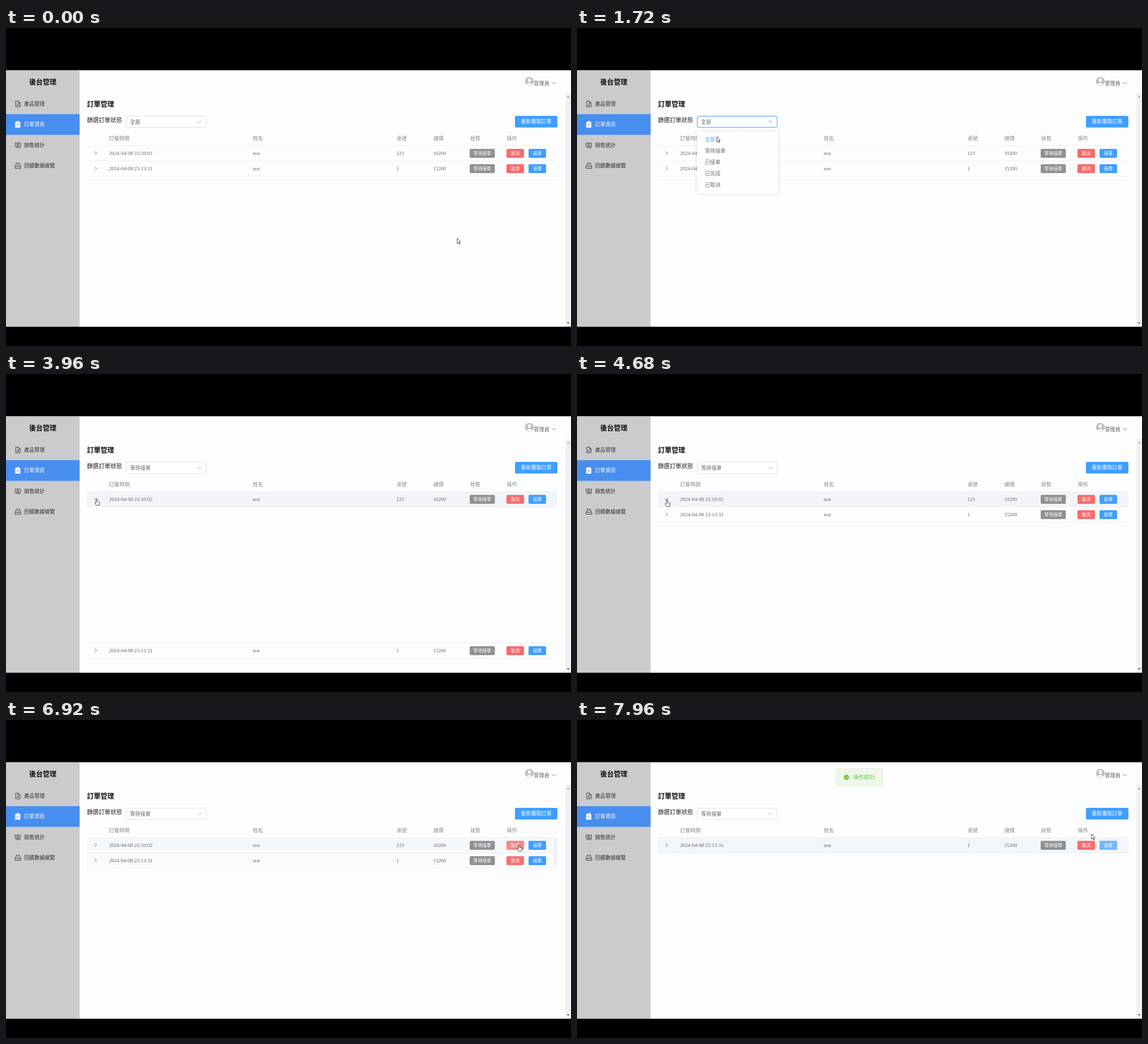
These frames come from a looping animation (998 px wide and 561 px high, 8 s). An HTML page:

```html
<!DOCTYPE html>
<html lang="zh-TW">
<head>
<meta charset="utf-8">
<title>訂單管理</title>
<style>
  html, body { margin: 0; width: 100%; height: 100%; overflow: hidden; background: #000; }
  svg { display: block; width: 998px; height: 561px; }
  text {
    font-family: "Liberation Serif", "Noto Sans CJK TC", "Noto Sans CJK", "Noto Sans CJK JP", serif;
    font-size: 9.07px; fill: #606266;
  }
</style>
</head>
<body>
<svg id="stage" viewBox="0 0 998 561"></svg>
<script>
const NS = 'http://www.w3.org/2000/svg';
const LOOP = 8000;
const BLUE = '#409eff', RED = '#f56c6c', GREEN = '#67c23a';
const stage = document.getElementById('stage');

function el(parent, tag, attrs = {}) {
  const node = document.createElementNS(NS, tag);
  for (const k in attrs) node.setAttribute(k, attrs[k]);
  parent.appendChild(node);
  return node;
}
const group = (p, attrs) => el(p, 'g', attrs);
const rect = (p, x, y, width, height, fill, more) =>
  el(p, 'rect', { x, y, width, height, fill, ...more });
const path = (p, d, stroke, more) =>
  el(p, 'path', { d, fill: 'none', stroke, 'stroke-width': 1, ...more });
// y is the middle of the line of text
function label(p, x, y, str, { size = 9.07, fill = '#606266', weight = 400 } = {}) {
  const n = el(p, 'text', { x, y: y + size * 0.37, style: `font-size:${size}px;fill:${fill};font-weight:${weight}` });
  n.textContent = str;
  return n;
}
const move = (n, x, y, rot = 0) => n.setAttribute('transform', `translate(${x} ${y}) rotate(${rot})`);
const alpha = (n, v) => n.setAttribute('opacity', v.toFixed(3));

// ---------- timing ----------
const clamp = x => Math.max(0, Math.min(1, x));
const smooth = x => { x = clamp(x); return x * x * (3 - 2 * x); };
const fade = (t, on, off, d) => smooth((t - on) / d) - smooth((t - off) / d);

const MENU = [[1000, 1630], [1950, 2350]];
const EXPAND = [[3040, 4630], [5240, 6260]];
const PICK = 2350, BLUR = 3040, REMOVED = 7360;
const BUSY = [7060, 7360];
const TOAST = 7520;
const DETAIL = 240;

// time, x, y of the pointer tip
const TRACK = [
  [0, 797, 371], [160, 797, 371], [820, 300, 162], [1080, 290, 163],
  [1400, 247, 191.5], [1700, 247, 191.5], [1720, 247, 191.5], [1880, 262, 163],
  [2000, 262, 164], [2220, 250, 212], [2440, 250, 212], [2820, 163, 216],
  [3200, 163, 216], [4400, 159, 222], [4720, 159, 222], [5040, 159, 244],
  [6300, 159, 244], [6700, 880, 290], [6880, 906, 220], [7140, 906, 220],
  [7440, 949, 224], [7830, 949, 224], [7960, 909, 201]
];
function pointer(t) {
  let i = 0;
  while (i < TRACK.length - 2 && t > TRACK[i + 1][0]) i++;
  const [a, ax, ay] = TRACK[i], [b, bx, by] = TRACK[i + 1];
  const k = smooth((t - a) / (b - a));
  return [ax + (bx - ax) * k, ay + (by - ay) * k];
}
const within = (t, [a, b]) => t >= a && t < b;
const menuOpen = t => MENU.some(m => within(t, m));
const grown = (t, i) => within(t, EXPAND[i]) ? DETAIL : 0;
const rowTop = (t, i) => i === 0 ? 208 : t >= REMOVED ? 208 : 235 + grown(t, 0);
const rowShown = (t, i) => i === 1 || t < REMOVED;
const onRow = (t, i) => {
  const y = pointer(t)[1] - rowTop(t, i);
  return rowShown(t, i) && !menuOpen(t) && y >= 0 && y < 27;
};
const onSpan = (t, i, a, b) => {
  const x = pointer(t)[0], y = pointer(t)[1] - rowTop(t, i);
  return rowShown(t, i) && x >= a && x < b && y > 4 && y < 22;
};
// share of the last 240 ms in which a test held
function recent(t, test) {
  let n = 0;
  for (let k = 0; k < 12; k++) if (test(Math.max(0, t - k * 20))) n++;
  return Math.sin(n / 12 * Math.PI / 2);
}
function overLink(t) {
  if (t > BUSY[0] + 40) return false;
  const [x, y] = pointer(t);
  if (x > 212 && x < 354 && y > 155 && y < 176) return true;
  if (menuOpen(t - 90) && x > 212 && x < 354 && y > 183 && y < 292) return true;
  return [0, 1].some(i => onSpan(t, i, 150, 168) || onSpan(t, i, 884, 915) || onSpan(t, i, 923, 954));
}

// ---------- page ----------
rect(stage, 0, 0, 998, 561, '#000');
const clip = el(el(stage, 'defs'), 'clipPath', { id: 'page' });
rect(clip, 0, 74, 998, 453);
const page = group(stage, { 'clip-path': 'url(#page)' });
rect(page, 0, 74, 998, 453, '#fdfdfd');

// sidebar
rect(page, 0, 74, 130, 453, '#cbcbcd');
rect(page, 0, 152, 130, 36.5, '#488eee');
label(page, 41, 96, '後台管理', { size: 12, fill: '#111', weight: 700 });
['產品管理', '訂單資訊', '銷售統計', '回饋數據總覽'].forEach((s, i) =>
  label(page, 32, 133.5 + i * 36.5, s, { fill: i === 1 ? '#fff' : '#303133' }));
path(page, 'M17 129h5l3 3v7h-8zM22 129v3h3M19 134h4M19 136.500h4', '#303133', { 'stroke-width': .9 });
path(page, 'M16.500 166h8.500v9.500h-8.500zM19 164.500h3.500v2.500h-3.500z', '#fff', { fill: '#fff', 'stroke-width': .5 });
path(page, 'M18.500 169.500h4.500M18.500 172h4.500', '#488eee', { 'stroke-width': .8 });
path(page, 'M16 203h9.500v6h-9.500zM17.500 211h8', '#303133', { 'stroke-width': .9 });
el(page, 'circle', { cx: 20.7, cy: 206, r: 1.6, fill: 'none', stroke: '#303133', 'stroke-width': .9 });
path(page, 'M16 243l2-2v-2.500h6v2.500l2 2v4.500h-10zM16 243l3 1.500h4l3-1.500M19.500 241.500h3', '#303133', { 'stroke-width': .9 });

// account
el(page, 'circle', { cx: 924.5, cy: 94, r: 7.8, fill: '#c0c0cc' });
el(page, 'circle', { cx: 924.5, cy: 92, r: 2.9, fill: '#fdfdfd' });
path(page, 'M919.500 99.500q5-5.500 10 0q-5 3-10 0z', 'none', { fill: '#fdfdfd' });
label(page, 932.5, 98, '管理員');
path(page, 'M964 95.500l3.500 3.500l3.500-3.500', '#606266', { 'stroke-width': .8 });

// window scroll bar
rect(page, 988, 114, 10, 413, '#f1f1f4');
path(page, 'M990.500 122.500h5l-2.500-3z', 'none', { fill: '#a3a3a3' });
path(page, 'M990.500 519h5l-2.500 3z', 'none', { fill: '#606060' });

// heading and filter
label(page, 143, 134.5, '訂單管理', { size: 12, fill: '#111', weight: 700 });
label(page, 143, 162, '篩選訂單狀態', { size: 10.37, fill: '#222' });
const field = rect(page, 212.5, 155.5, 141, 19.8, '#fff', { rx: 2.4, stroke: '#dcdfe6' });
const choice = label(page, 219, 165.5, '');
const caret = path(page, 'M-3.500 -1.700L0 1.700L3.500 -1.700', '#a8abb2', { 'stroke-width': .9 });
rect(page, 899, 155, 75, 20.5, BLUE, { rx: 2.6 });
label(page, 909.3, 164.5, '重新獲取訂單', { fill: '#fff' });

// table
[[182, '訂餐時間'], [436, '姓名'], [690, '桌號'], [755, '總價'], [820, '狀態'], [884.5, '操作']]
  .forEach(([x, s]) => label(page, x, 194.3, s, { fill: '#85888e', weight: 500 }));
const rule = (p, y) => rect(p, 143, y, 831, 1, '#ebeef5');
rule(page, 207);

function button(p, x, fill, light, str) {
  rect(p, x, 5.3, 31, 15.7, fill, { rx: 2 });
  const glow = rect(p, x, 5.3, 31, 15.7, light, { rx: 2 });
  label(p, x + 7.8, 13.3, str, { size: 7.8, fill: '#fff' });
  return glow;
}
const rows = [['2024-04-08 23:10:02', '123', '10200'], ['2024-04-08 23:13:31', '1', '15200']].map(([time, seat, sum]) => {
  const g = group(page);
  const tint = rect(g, 143, 0, 831, 26, '#f1f5f9');
  rule(g, 26);
  const arrow = path(g, 'M-1.600 -3L1.600 0L-1.600 3', '#606266', { 'stroke-width': .9 });
  label(g, 182, 12.8, time);
  label(g, 436, 12.8, 'test');
  label(g, 689.5, 12.8, seat);
  label(g, 754.5, 12.8, sum);
  rect(g, 819, 5.3, 44.5, 15.7, '#8f9294', { rx: 2 });
  label(g, 825.6, 13.3, '等待接單', { size: 7.8, fill: '#fff' });
  const cancel = button(g, 884, RED, '#f89898', '取消');
  const accept = button(g, 923, BLUE, '#79bbff', '接單');
  const end = rule(g, 26 + DETAIL);
  return { g, tint, arrow, cancel, accept, end };
});
const thumb = rect(page, 969, 209, 4, 48.5, '#dedfe2', { rx: 2 });

// drop-down
const menu = group(page);
rect(menu, 212, 183, 143, 109, '#fff', { rx: 2.6, style: 'filter:drop-shadow(0 0 4px rgba(0,0,0,.13))' });
path(menu, 'M279.500 183.500l3.500-3.500l3.500 3.500', '#e4e7ed', { fill: '#fff', 'stroke-width': .7 });
const options = ['全部', '等待接單', '已接單', '已完成', '已取消'].map((s, i) =>
  label(menu, 226, 197 + i * 20, s));

// busy veil
const veil = group(page);
rect(veil, 0, 74, 998, 453, '#000', { opacity: .7 });
label(veil, 483, 328, '載入中...', { fill: '#fff' });

// message
const toast = group(page);
rect(toast, 457.5, 85.5, 83, 31.5, '#eef7e9', { rx: 2.6, stroke: '#e4f3dc' });
el(toast, 'circle', { cx: 476, cy: 101, r: 4.6, fill: GREEN });
path(toast, 'M473.800 101l1.600 1.600l3-3', '#fff');
label(toast, 488, 101, '操作成功!', { fill: GREEN });

rect(page, 0, 74, 998, 1, '#808080');

// pointers, both with the tip at 0,0
const INK = { 'stroke-width': .8, 'stroke-linejoin': 'round', fill: '#fff' };
const arrowTip = path(stage, 'M0 0V9.300L2 7.500L3.500 10.700L4.900 10L3.500 7H6z', '#222', INK);
const hand = path(stage, 'M-1 .8Q0 -.6 1 .8V4.500L4.200 5.200Q5.400 5.600 5.200 7L4.500 11.500H-.6L-3.500 7.600Q-3.600 6.300 -2.400 6.500L-1 7.500z', '#222', INK);
path(stage, '', '#222');

function draw(t) {
  const opened = MENU.reduce((v, [a, b]) => v + fade(t, a, b, 300), 0);
  alpha(menu, Math.min(1, opened * 1.2));
  move(caret, 341.5, 165.5, -180 * opened);
  const picked = t >= PICK ? 1 : 0;
  choice.textContent = options[picked].textContent;
  options.forEach((o, i) => { o.style.fill = i === picked ? BLUE : '#606266'; });
  field.setAttribute('stroke', t >= MENU[0][0] && t < BLUR ? BLUE : '#dcdfe6');

  rows.forEach((r, i) => {
    r.g.setAttribute('display', rowShown(t, i) ? 'inline' : 'none');
    move(r.g, 0, rowTop(t, i));
    alpha(r.tint, recent(t, u => onRow(u, i)));
    alpha(r.cancel, recent(t, u => onSpan(u, i, 884, 915)));
    alpha(r.accept, recent(t, u => onSpan(u, i, 923, 954)));
    move(r.arrow, 158.5, 12.8, 90 * fade(t, ...EXPAND[i], 200));
    alpha(r.end, grown(t, i) ? 1 : 0);
  });
  alpha(thumb, t < BLUR ? fade(t, 2600, BLUR - 120, 120) : 0.6 * fade(t, 6800, 7160, 200));

  alpha(veil, fade(t, ...BUSY, 300));
  const slide = smooth((t - TOAST) / 400);
  alpha(toast, slide);
  move(toast, 0, -32 * (1 - slide));

  const [x, y] = pointer(t), link = overLink(t);
  move(arrowTip, x, y);
  move(hand, x, y);
  alpha(arrowTip, link ? 0 : 1);
  alpha(hand, link ? 1 : 0);
}

const start = performance.now();
function tick() {
  draw((performance.now() - start) % LOOP);
  requestAnimationFrame(tick);
}
tick();
</script>
</body>
</html>
```
